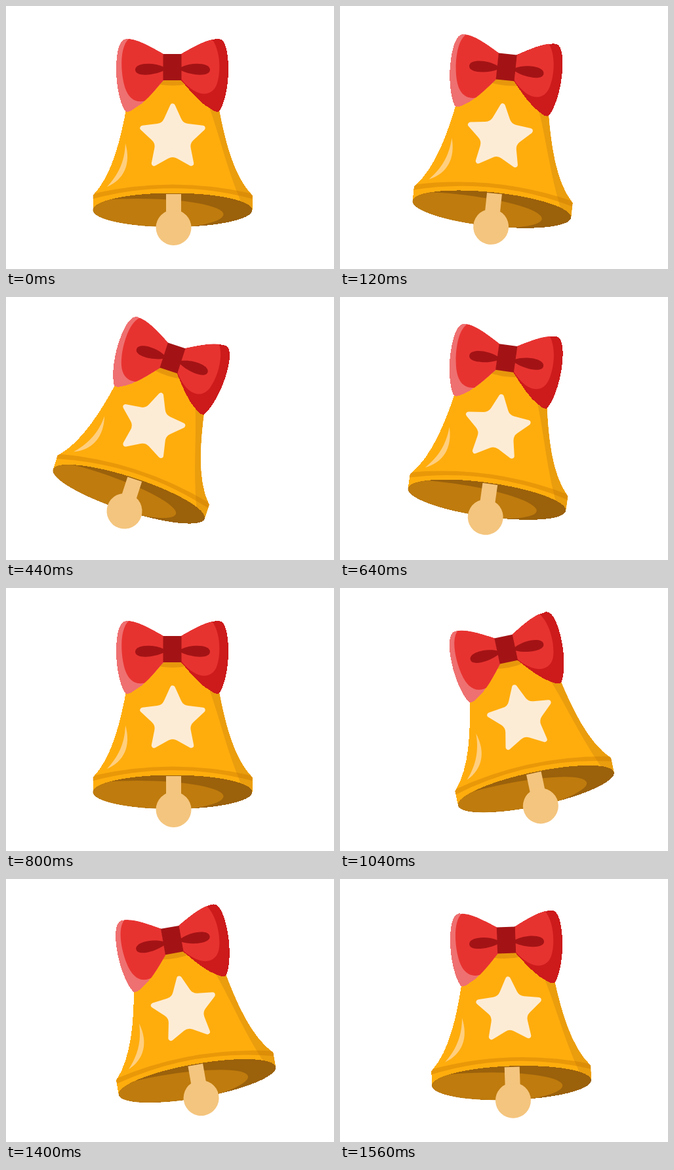
Recreate the animation shown at these times as an HTML page. Size 500 by 400 pixels, loop 1600 ms.

```html
<!DOCTYPE html>
<html>
<head>
<meta charset="utf-8">
<style>
  html, body { margin: 0; width: 100%; height: 100%; overflow: hidden; background: #fff; }
  svg { display: block; width: 100%; height: 100%; }
  .hard { shape-rendering: crispEdges; }
</style>
</head>
<body>
<svg viewBox="0 0 500 400">
  <defs>
    <path id="body" d="M240 105C212 112 190 130 183 158C175 200 162 258 132.500 288V310H375.500V288C346 258 333 200 325 158C318 130 296 112 268 105Z"/>
    <path id="left" d="M240 73C217 60 200 50 183 50C172 51 168 72 168 97C168 122 174 148 181 159C183 162 187 161 191 159C211 149 227 128 240 113Z"/>
    <path id="right" d="M267 73C290 60 307 50 325 50C335 51 339 72 339 97C339 122 333 148 326 159C324 162 320 161 316 159C296 149 280 128 267 113Z"/>
    <path id="loop" d="M241 93C225 85 197 86 197 97C197 108 225 106 241 98Z"/>
    <ellipse id="mouth" cx="254" cy="310.300" rx="121.500" ry="25.800"/>
    <clipPath id="inBody"><use href="#body"/></clipPath>
    <clipPath id="inLeft"><use href="#left"/></clipPath>
    <clipPath id="inRight"><use href="#right"/></clipPath>
    <clipPath id="inMouth"><use href="#mouth"/></clipPath>
  </defs>
  <g id="bell">
    <use class="hard" href="#body" fill="#ffad0d"/>
    <g clip-path="url(#inBody)">
      <path fill="#ea9d0d" d="M304 140C322 180 336 250 362 306H390V130Z"/>
      <path fill="#e7970c" d="M225 105H283L276 119Q254 123 232 119Z"/>
      <path fill="#c87800" fill-opacity=".4" d="M130 286Q254 257 378 286V294Q254 260.500 130 294Z"/>
    </g>
    <path fill="#ffcf80" d="M182 209C191 240 180 264 154 275C170 258 181 238 182 209Z"/>
    <use class="hard" href="#mouth" fill="#9b610b"/>
    <ellipse cx="200" cy="317" rx="131.500" ry="24" fill="#bf7b0d" clip-path="url(#inMouth)"/>
    <path fill="#f4c57e" d="M244 286H267V320H244Z"/>
    <circle cx="255.500" cy="337" r="27" fill="#f4c57e"/>
    <path id="star" fill="#fdecd5" stroke="#fdecd5" stroke-width="8" stroke-linejoin="round"/>
    <use class="hard" href="#left" fill="#ef7070"/>
    <path clip-path="url(#inLeft)" fill="#e73330" d="M190 48C173 58 175 96 179 115C184 140 197 150 216 143L250 120V40Z"/>
    <use class="hard" href="#right" fill="#cd1a1b"/>
    <path clip-path="url(#inRight)" fill="#e73330" d="M310 46C327 62 328 98 322 117C316 138 292 142 267 111V40Z"/>
    <g fill="#a31315">
      <use href="#loop"/>
      <use href="#loop" transform="matrix(-1 0 0 1 508 0)"/>
      <path d="M239.500 73H267.500V113H239.500Z"/>
    </g>
  </g>
</svg>
<script>
  const PERIOD = 1600, STEP = 40, SWING = 20;
  const bell = document.getElementById('bell');

  const polar = (radius, turn) => {
    const angle = (turn / 5 - 0.25) * 2 * Math.PI;
    return [254 + radius * Math.cos(angle), 200.5 + radius * Math.sin(angle)];
  };
  const mix = (a, b, t) => a.map((v, i) => v + (b[i] - v) * t);

  // Five tips joined through softened inner corners
  let star = '';
  for (let i = 0; i < 5; i++) {
    const tip = polar(48, i), inner = polar(23, i + 0.5), next = polar(48, i + 1);
    star += `${i ? 'L' : 'M'}${tip}L${mix(tip, inner, 0.7)}Q${inner} ${mix(inner, next, 0.3)}`;
  }
  document.getElementById('star').setAttribute('d', star + 'Z');

  // Linear swing: rest, right-hand turn, rest, left-hand turn
  const swing = time => {
    const quarter = time / PERIOD * 4;
    if (quarter <= 1) return quarter;
    return quarter <= 3 ? 2 - quarter : quarter - 4;
  };

  const start = performance.now();
  function draw(now) {
    const elapsed = Math.max(0, now - start) % PERIOD;
    const time = Math.floor(elapsed / STEP) * STEP;
    bell.setAttribute('transform', `rotate(${SWING * swing(time)} 254 94.5)`);
    requestAnimationFrame(draw);
  }
  draw(start);
</script>
</body>
</html>
```
